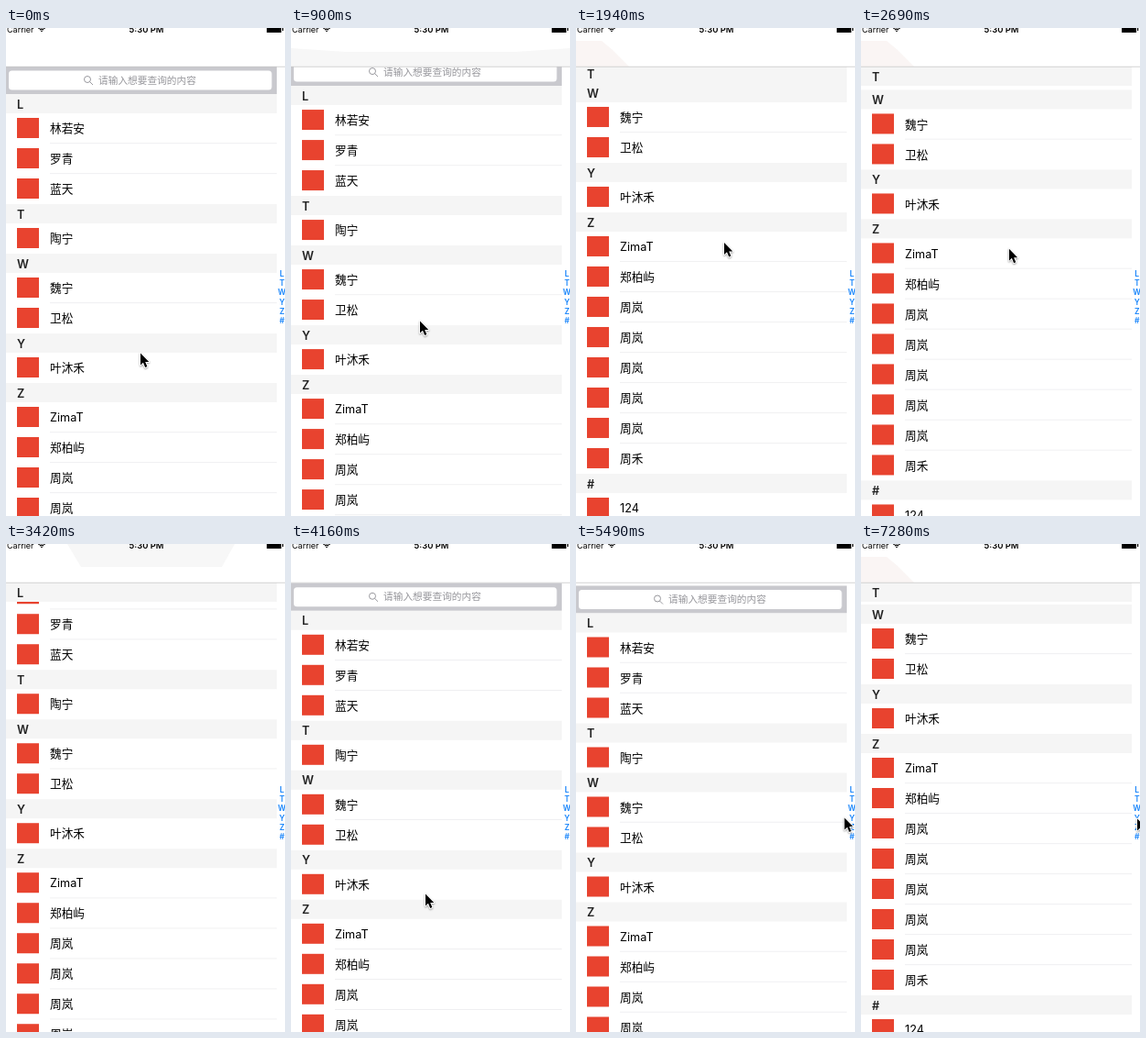
An HTML page with a canvas for the animation above (8000 ms loop, 305 by 532 pixels).

```html
<!DOCTYPE html>
<html lang="zh">
<head>
<meta charset="utf-8">
<title>Contact list</title>
<style>
html, body { margin: 0; width: 100%; height: 100%; overflow: hidden; background: #fff; }
canvas { display: block; width: 305px; height: 532px; }
</style>
</head>
<body>
<canvas id="stage"></canvas>
<script>
const W = 305, H = 532, LOOP = 8000;
const START = 900, TICK = 148;
const NAV = 42, LIST_W = 296, HEADER_H = 21, ROW_H = 33, LIST_TOP = 72;
const SCROLL_END = 180;
const FONT = '"Inter", "Noto Sans CJK SC", "Noto Sans CJK", "Noto Sans", sans-serif';

const sections = [
  ['L', '林若安', '罗青', '蓝天'],
  ['T', '陶宁'],
  ['W', '魏宁', '卫松'],
  ['Y', '叶沐禾'],
  ['Z', 'ZimaT', '郑柏屿', ...Array(5).fill('周岚'), '周禾'],
  ['#', '124']
];

// Times are in ticks. A swipe glides past its rest by "over", then springs back.
const swipes = [
  { start: -1, end: 6.2, rest: SCROLL_END, over: 10.5 },
  { start: 11.5, end: 20.35, rest: 0, over: -2.5 },
  { start: 23, end: 27, rest: 0, over: -56 },
  { start: 37, end: 37, rest: SCROLL_END, over: 0 }
];

const pointerHome = { x: 146, y: 353 };
const pointerMoves = [
  { start: -1, end: 0, x: 140, y: 318 },
  { start: 0, end: 7, x: 161, y: 232.5 },
  { start: 11.5, end: 17, x: 155, y: 560 },
  { start: 17, end: 22, x: 146, y: 380 },
  { start: 23, end: 27, x: 146, y: 460 },
  { start: 27, end: 31, x: 292.5, y: 297 },
  { start: 31, end: 33, x: 299, y: 286 },
  { start: 41, end: 43, x: 301, y: 298 }
];

const canvas = document.getElementById('stage');
const ctx = canvas.getContext('2d');
const dpr = window.devicePixelRatio || 1;
canvas.width = W * dpr;
canvas.height = H * dpr;

const mix = (a, b, t) => a + (b - a) * t;
const ease = t => (1 - Math.cos(Math.PI * t)) / 2;
const progress = (tick, { start, end }) => ease((tick - start) / (end - start));

function scrollAt(tick) {
  let from = 0, value = 0;
  for (const swipe of swipes) {
    if (tick < swipe.start) break;
    const { end, rest, over } = swipe;
    value = tick < end
      ? mix(from, rest + over, progress(tick, swipe))
      : rest + over * 0.5 ** (tick - end);
    from = rest;
  }
  return value;
}

function pointerAt(tick) {
  let point = pointerHome;
  for (const move of pointerMoves) {
    if (tick < move.start) break;
    const t = tick < move.end ? progress(tick, move) : 1;
    point = { x: mix(point.x, move.x, t), y: mix(point.y, move.y, t) };
  }
  return point;
}

function rect(x, y, w, h, color) {
  ctx.fillStyle = color;
  ctx.fillRect(x, y, w, h);
}

function text(value, x, centerY, size, color, weight = 400, align = 'left') {
  ctx.font = `${weight} ${size}px ${FONT}`;
  ctx.textAlign = align;
  ctx.fillStyle = color;
  ctx.fillText(value, x, centerY + size * 0.37);
}

function polygon(points, color) {
  ctx.beginPath();
  points.forEach(([x, y]) => ctx.lineTo(x, y));
  ctx.closePath();
  ctx.fillStyle = color;
  ctx.fill();
}

function drawSearch(y) {
  rect(0, y, LIST_W, 30, '#c9c9ce');
  ctx.beginPath();
  ctx.roundRect(3, y + 4.5, 287.5, 21, 3.5);
  ctx.fillStyle = '#fff';
  ctx.fill();
  ctx.strokeStyle = '#8e8e93';
  ctx.lineWidth = 0.9;
  ctx.beginPath();
  ctx.arc(89, y + 14, 3.5, 0, Math.PI * 2);
  ctx.moveTo(91.6, y + 16.6);
  ctx.lineTo(95, y + 20);
  ctx.stroke();
  text('请输入想要查询的内容', 101, y + 14.7, 10.7, '#96969b');
}

function drawHeader(title, y) {
  rect(0, y, LIST_W, HEADER_H, '#f5f5f5');
  text(title, 12, y + 11, 12.7, '#222', 600);
}

function drawRow(name, y, last) {
  rect(12, y + 5, 24, 22, '#e8432f');
  text(name, 48, y + 16.5, 12.7, '#000');
  if (!last) rect(48, y + ROW_H - 0.7, LIST_W - 48, 0.8, '#ececee');
}

function drawList(scroll) {
  let y = LIST_TOP - scroll;
  drawSearch(y - 30);
  const headers = [];
  for (const [title, ...names] of sections) {
    const top = y;
    y += HEADER_H;
    names.forEach((name, i) => {
      drawRow(name, y, i === names.length - 1);
      y += ROW_H;
    });
    // Headers stick below the bar until the next section pushes them out.
    headers.push([title, Math.min(Math.max(top, NAV), y - HEADER_H)]);
  }
  headers.forEach(([title, top]) => drawHeader(title, top));
}

// Content scrolled under the bar shows through as a faint tint.
function drawTint(scroll) {
  if (scroll > 100) {
    polygon([[0, 14], [28, 14], [40, 24], [58, 42], [0, 42]], '#faf5f4');
  } else if (scroll > 30) {
    polygon([[67, 0], [250, 0], [236, 25], [82, 25]], '#f7f7f7');
  } else if (scroll > 3) {
    polygon([[0, 22], [60, 26], [245, 26], [305, 22], [305, 42], [0, 42]], '#f7f7f7');
  }
}

function drawNav(scroll) {
  rect(0, 0, W, NAV, '#fff');
  drawTint(scroll);
  rect(0, NAV - 0.2, W, 0.8, '#c8c8c8');

  text('Carrier', 1, 1.7, 9, '#000');
  text('5:30 PM', 153.5, 1.7, 9.4, '#000', 600, 'center');
  ctx.strokeStyle = '#000';
  ctx.lineWidth = 1.2;
  for (const radius of [1, 3, 5]) {
    ctx.beginPath();
    ctx.arc(39, 4.3, radius, Math.PI * 1.25, Math.PI * 1.75);
    ctx.stroke();
  }
  rect(285, -2, 16, 7, '#000');
  rect(302, 0, 1.2, 3, '#000');
}

function drawIndex() {
  sections.forEach(([title], i) =>
    text(title, 301.7, 267.8 + i * 10.25, 8.5, '#1684fb', 600, 'center'));
}

function drawPointer({ x, y }) {
  ctx.save();
  ctx.translate(x, y);
  const arrow = [[1, 1.5], [1, 14.5], [4, 11.7], [6.2, 17], [8.4, 16], [6.2, 11], [10.3, 11]];
  ctx.shadowColor = 'rgba(0,0,0,.3)';
  ctx.shadowBlur = 2;
  ctx.shadowOffsetY = 1;
  polygon(arrow, '#000');
  ctx.strokeStyle = '#fff';
  ctx.lineWidth = 2;
  ctx.lineJoin = 'round';
  ctx.stroke();
  ctx.shadowColor = 'transparent';
  polygon(arrow, '#000');
  ctx.restore();
}

function draw(time) {
  const tick = Math.floor((time % LOOP - START) / TICK);
  const moment = Math.max(tick, -1);
  const scroll = scrollAt(moment);
  ctx.setTransform(dpr, 0, 0, dpr, 0, 0);
  rect(0, 0, W, H, '#fff');
  drawList(scroll);
  drawNav(scroll);
  drawIndex();
  drawPointer(pointerAt(moment));
}

const origin = performance.now();
function frame() {
  draw(performance.now() - origin);
  requestAnimationFrame(frame);
}
frame();
</script>
</body>
</html>
```
